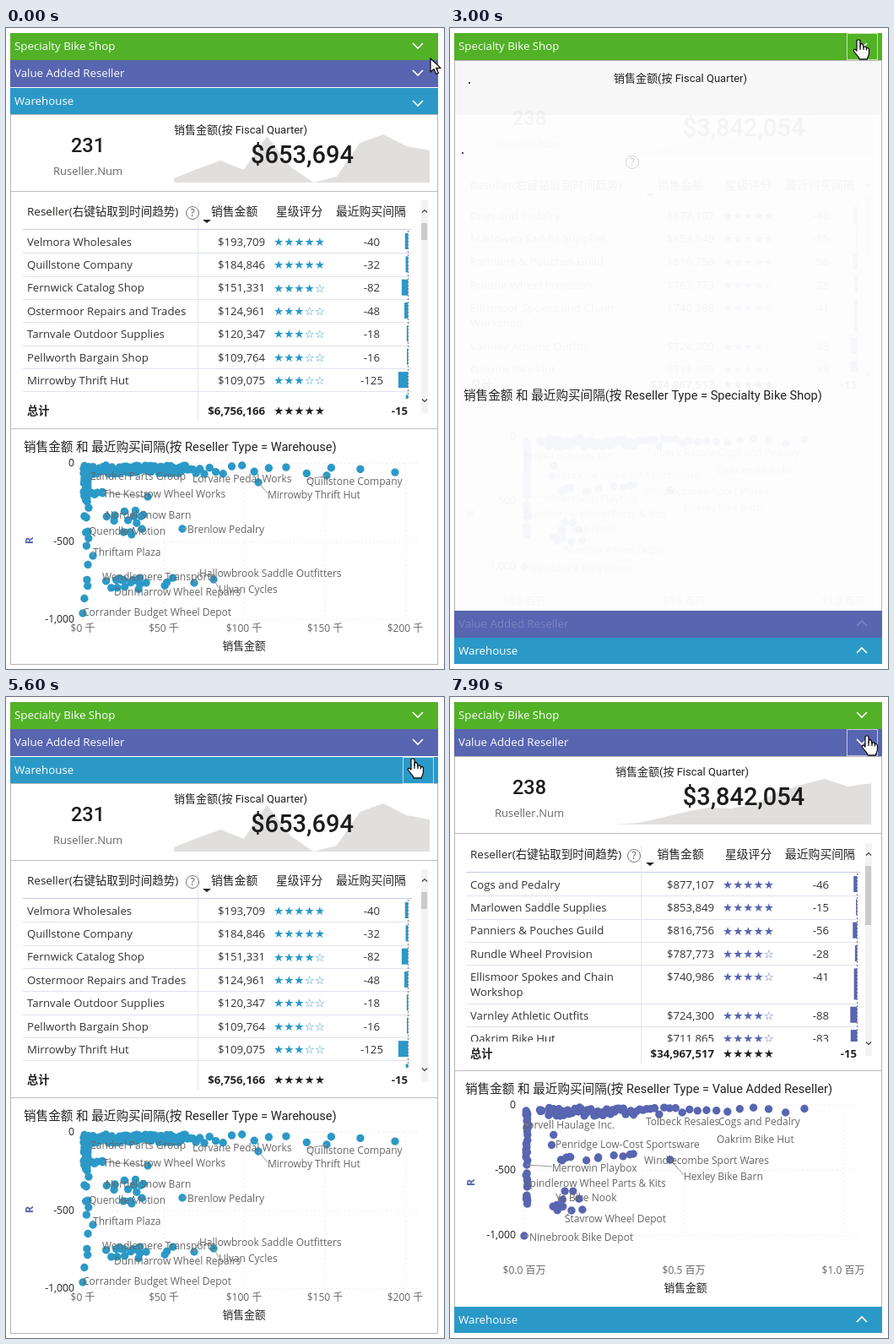
Recreate the animation shown at these times as an HTML page with a canvas. Size 519x759 px, loop 8000 ms.

```html
<!DOCTYPE html>
<html lang="zh">
<head>
<meta charset="utf-8">
<title>Reseller dashboard</title>
<style>
  html, body { margin: 0; width: 100%; height: 100%; overflow: hidden; background: #fff; }
  canvas { display: block; width: 519px; height: 759px; }
</style>
</head>
<body>
<canvas id="stage" width="519" height="759"></canvas>
<script>
const ctx = document.getElementById('stage').getContext('2d');
const LOOP = 8000, STEP = 100;
const CJK = '"Noto Sans CJK SC", "Noto Sans CJK", "Noto Sans CJK JP", sans-serif';
const UI = '"Open Sans", "Noto Sans", ' + CJK;
const DIN = 'Roboto, ' + CJK;
const STAR = '"DejaVu Sans", sans-serif';
const HEADERS = [['Specialty Bike Shop', '#52b127'], ['Value Added Reseller', '#5865b1'], ['Warehouse', '#2b99c7']];

const clamp = v => Math.max(0, Math.min(1, v));
const rand = n => { const v = Math.sin(n * 12.9898) * 43758.5453; return v - Math.floor(v); };

// Text is placed by the vertical middle of its capitals.
function text(str, x, y, { size = 13.2, color = '#333', align = 'left', font = UI, weight = 400 } = {}) {
  ctx.font = `${weight} ${size}px ${font}`;
  ctx.fillStyle = color;
  ctx.textAlign = align;
  ctx.fillText(str, x, y + size * 0.36);
}
function line(points, color, width = 1, dash = []) {
  ctx.strokeStyle = color;
  ctx.lineWidth = width;
  ctx.setLineDash(dash);
  ctx.beginPath();
  points.forEach(p => ctx.lineTo(...p));
  ctx.stroke();
  ctx.setLineDash([]);
}
function fillPoly(points, color) {
  ctx.fillStyle = color;
  ctx.beginPath();
  points.forEach(p => ctx.lineTo(...p));
  ctx.fill();
}
const row = (y, x0, x1, color, dash) => line([[x0, y + 0.5], [x1, y + 0.5]], color, 1, dash);
const column = (x, y0, y1, color, dash) => line([[x + 0.5, y0], [x + 0.5, y1]], color, 1, dash);
function rect(x, y, w, h, color) { ctx.fillStyle = color; ctx.fillRect(x, y, w, h); }
function group([x, y], draw) { ctx.save(); ctx.translate(x, y); draw(); ctx.restore(); }
function faded(alpha, draw) {
  if (alpha <= 0) return;
  ctx.save();
  ctx.globalAlpha *= alpha;
  draw();
  ctx.restore();
}
function chevron(x, y, up, size, color, width) {
  const d = up ? -size / 2 : size / 2;
  line([[x - size, y - d], [x, y + d], [x + size, y - d]], color, width);
}

// quarters: area heights; rows: name, sales, stars, gap in days
// band: u in 0..1 to x along the top of the scatter; clusters: count, x, y, width, height
// labels: text, x, y and, where it has one, the dot it belongs to
const smallShop = {
  count: '231', sales: '$653,694', total: '$6,756,166', shift: 0,
  quarters: [5, 16, 26, 15, 55, 19, 0, 7, 47, 57, 43, 38],
  rows: [
    ['Velmora Wholesales', '$193,709', 5, 40],
    ['Quillstone Company', '$184,846', 5, 32],
    ['Fernwick Catalog Shop', '$151,331', 4, 82],
    ['Ostermoor Repairs and Trades', '$124,961', 3, 48],
    ['Tarnvale Outdoor Supplies', '$120,347', 3, 18],
    ['Pellworth Bargain Shop', '$109,764', 3, 16],
    ['Mirrowby Thrift Hut', '$109,075', 3, 125],
    ['', '', 0, 30]],
  yStep: 92.5, xStep: 95.5, xLabels: ['$0 千', '$50 千', '$100 千', '$150 千', '$200 千'],
  origin: [0, 0], bandSize: 130, bandY: 518,
  band: u => 92 + 132 * u + 237 * u ** 24,
  clusters: [[35, 92, 520, 5, 45], [10, 91, 560, 7, 135], [5, 100, 547, 17, 8], [11, 100, 571, 82, 24],
    [3, 137, 596, 12, 4], [20, 94, 651, 105, 14]],
  labels: [
    ['Zandrel Parts Group', 100, 531], ['Lorvane Pedal Works', 221, 534],
    ['Quillstone Company', 356, 537, 380, 530], ['The Kestrow Wheel Works', 115, 552, 168, 555],
    ['Mirrowby Thrift Hut', 310, 553, 299, 538], ['Nordel Snow Barn', 118, 577],
    ['Quendle Motion', 98, 596], ['Brenlow Pedalry', 215, 594, 209, 593],
    ['Thriftam Plaza', 103, 621, 103, 625], ['Wendlemere Transports', 114, 650],
    ['Hallowbrook Saddle Outfitters', 229, 646, 223, 657], ['Dunmarrow Wheel Repairs', 128, 668],
    ['Ulvan Cycles', 252, 665, 246, 653], ['Corrander Budget Wheel Depot', 91, 692, 91, 693]]
};

const bigShop = {
  count: '238', sales: '$3,842,054', total: '$34,967,517', shift: 7,
  quarters: [0, 2, 8, 15, 20, 19, 25, 38, 47, 54, 45, 49],
  rows: [
    ['Cogs and Pedalry', '$877,107', 5, 46],
    ['Marlowen Saddle Supplies', '$853,849', 5, 15],
    ['Panniers & Pouches Guild', '$816,756', 5, 56],
    ['Rundle Wheel Provision', '$787,773', 4, 28],
    ['Ellismoor Spokes and Chain|Workshop', '$740,986', 4, 41],
    ['Varnley Athletic Outfits', '$724,300', 4, 88],
    ['Oakrim Bike Hut', '$711,865', 4, 83]],
  yStep: 77, xStep: 189, xLabels: ['$0.0 百万', '$0.5 百万', '$1.0 百万'],
  origin: [3, 32], bandSize: 75, bandY: 486,
  band: u => 117 + 145 * u ** 1.3 + 158 * u ** 10,
  clusters: [[45, 90, 490, 2, 114], [4, 93, 489, 20, 2], [2, 117, 517, 9, 14], [12, 122, 541, 115, 8],
    [9, 117, 580, 45, 28]],
  labels: [
    ['Jorvell Haulage Inc.', 89, 507, 93, 507], ['Tolbeck Resales', 232, 503],
    ['Cogs and Pedalry', 318, 503], ['Oakrim Bike Hut', 316, 524],
    ['Penridge Low-Cost Sportsware', 125, 530], ['Windlecombe Sport Wares', 230, 549],
    ['Merrowin Playbox', 121, 558, 91, 554], ['Hexley Bike Barn', 277, 568, 261, 548],
    ['Spindlerow Wheel Parts & Kits', 88, 576], ['Ye Bike Nook', 125, 593],
    ['Stavrow Wheel Depot', 136, 618, 144, 608], ['Ninebrook Bike Depot', 94, 640, 88, 638]]
};

// shift: how far the content lies from its place on the last page
const pages = [
  { data: smallShop, shift: [-5, -61], thumb: 72 },
  { data: bigShop, shift: [-3, -32], thumb: 70 },
  { data: smallShop, shift: [0, 0], thumb: 20 }
];
pages.forEach(page => {
  const [x, y] = page.shift;
  page.tableShift = [Math.trunc(x * 0.6), Math.round(y * 0.98)];
});

// Headers after the open one stack at the bottom.
const headerTop = (i, open) => i > open ? 658 + 32 * i : [6, 38, 71][i];
const headerHeight = i => i === 2 ? 31 : 32;

function drawHeaders(open, age) {
  const all = open === 2;
  HEADERS.forEach(([title, color], i) => {
    const y = headerTop(i, open);
    faded(all ? clamp(0.16 + age / 350) : 1, () => rect(5, y, 507, headerHeight(i), color));
    const fresh = i === open + 1 || (all && i > 0);
    faded(fresh ? clamp(0.2 + age / 250) : 1, () => {
      text(title, 10, y + 15, { size: 13.3, color: '#fff' });
      chevron(488, y + (all && i === 2 ? 18 : 15), i > open, 6, '#fff', 1.6);
    });
  });
}

function drawCard({ quarters, count, sales }) {
  const tops = quarters.map((h, i) => [199 + 27.55 * i, 183 - h]);
  fillPoly([[199, 183], ...tops, [502, 183]], '#e0dfde');
  const number = { font: DIN, align: 'center', color: '#1c1c1c', weight: 500 };
  text(count, 97, 139, { ...number, size: 23.5 });
  text('Ruseller.Num', 97, 169, { size: 13, align: 'center', color: '#666' });
  text(sales, 351, 150, { ...number, size: 29 });
}

function drawTable({ rows, total, shift }, color) {
  const stars = { size: 13.6, font: STAR };
  const head = { size: 13.8, color: '#252423' };
  text('Reseller(右键钻取到时间趋势)', 25, 217, { ...head, size: 13.5 });
  text('销售金额', 243 + shift / 2, 217, head);
  text('星级评分', 320 + shift, 217, head);
  text('最近购买间隔', 391 + shift, 217, head);
  fillPoly([[233, 227], [243, 227], [238, 231]], '#222');
  row(238, 20, 480 + shift, '#c3c9e4');
  column(227, 207, 465, '#e4e6f2');

  ctx.save();
  ctx.beginPath();
  ctx.rect(15, 239, 475, 200);
  ctx.clip();
  let y = 253;
  rows.forEach(([name, value, score, gap]) => {
    const parts = name.split('|'), extra = 18 * (parts.length - 1), w = Math.max(1, gap * 0.093);
    parts.forEach((part, k) => text(part, 25, y + 18 * k));
    if (value) {
      text(value, 307 + shift, y, { align: 'right' });
      text('★'.repeat(score) + '☆'.repeat(5 - score), 317 + shift, y, { ...stars, color });
      text('-' + gap, 433.5 + shift, y, { align: 'center' });
    }
    rect(476.5 + shift - w, y - 10, w, 19 + extra, color);
    y += 27.35 + extra;
    row(Math.round(y - 14), 20, 480 + shift, '#dfe2f2');
  });
  column(476 + shift, 240, 439, '#777', [2, 2]);
  ctx.restore();

  const bold = { weight: 700, color: '#222' };
  text('总计', 25, 453, bold);
  text(total, 307 + shift, 453, { ...bold, align: 'right' });
  text('★★★★★', 317 + shift, 453, { ...stars, color: '#222' });
  text('-15', 476 + shift, 453, { ...bold, align: 'right' });
}

function drawScroll(thumb) {
  rect(492, 204, 8, 252, '#f3f3f3');
  rect(492, 231, 7, thumb, '#cbcbcb');
  chevron(496, 217, true, 3, '#444', 1.2);
  chevron(496, 441, false, 3, '#444', 1.2);
}

function drawHelp() {
  ctx.strokeStyle = '#777';
  ctx.lineWidth = 1;
  ctx.beginPath();
  ctx.arc(221, 219, 7.5, 0, 7);
  ctx.stroke();
  text('?', 221, 219, { size: 12, align: 'center', color: '#555' });
}

function drawDots({ band, bandSize, bandY, clusters, labels }, color) {
  let seed = 1;
  const dot = (x, y) => { ctx.moveTo(x + 4.7, y); ctx.arc(x, y, 4.7, 0, 7); };
  ctx.fillStyle = color;
  ctx.beginPath();
  for (let i = 0; i <= bandSize; i++) dot(band(i / bandSize), bandY + 10 * rand(seed++));
  clusters.forEach(([count, x, y, w, h]) => {
    for (let i = 0; i < count; i++) dot(x + w * rand(seed++), y + h * rand(seed++) ** 1.3);
  });
  const anchored = labels.filter(label => label.length > 3);
  anchored.forEach(([, , , x, y]) => dot(x, y));
  ctx.fill();
  anchored.forEach(([, x, y, dotX, dotY]) => line([[dotX, dotY], [x, y - 2]], '#999'));
  labels.forEach(([label, x, y]) => text(label, x, y, { size: 12, color: '#666' }));
}

function drawScatter(data, color) {
  const grid = '#e2e2e2', dash = [1, 4];
  ['0', '-500', '-1,000'].forEach((label, i) => {
    const y = Math.round(515 + i * data.yStep);
    row(y, 91, 490, grid, dash);
    text(label, 81, y, { size: 12.2, align: 'right', color: '#222' });
  });
  data.xLabels.forEach((label, i) => {
    const x = Math.round(91 + i * data.xStep);
    column(x, 515, 515 + 2 * data.yStep, grid, dash);
    text(label, x, 711, { size: 12, color: '#666', align: 'center' });
  });
  text('销售金额', 282, 731, { size: 12.8, align: 'center', color: '#222' });
  group([27, 607], () => {
    ctx.rotate(-Math.PI / 2);
    text('R', 0, 0, { size: 13, weight: 700, align: 'center', color: HEADERS[1][1] });
  });
  group(data.origin, () => drawDots(data, color));
}

function drawContent(open) {
  const { data, shift, tableShift, thumb } = pages[open], color = HEADERS[open][1];
  group(shift, () => { drawCard(data); drawScatter(data, color); });
  group(tableShift, () => drawTable(data, color));
  group([0, tableShift[1]], () => drawScroll(thumb));
}

function drawPage(open, previous, age) {
  const { shift, tableShift } = pages[open], shown = clamp(age / 300);
  const top = 38 + 32 * open, bottom = Math.min(753, 690 + 32 * open);
  if (shown < 1) {
    rect(5, 38, 507, 652, '#fdfdfd');
    rect(5, open === 2 ? 690 : 38, 507, 65, '#f7f7f7');
    faded(0.04 * (1 - shown), () => drawContent(previous));
  }
  faded(shown, () => {
    drawContent(open);
    [193, 474].forEach(y => row(y + shift[1], 5, 512, '#bdbdbd'));
  });
  faded(0.3 + 0.7 * shown, () => group([shift[0], tableShift[1]], drawHelp));
  group(shift, () => {
    const title = { font: DIN, color: '#222' };
    text('销售金额(按 Fiscal Quarter)', 199, 120, { ...title, size: 13 });
    text(`销售金额 和 最近购买间隔(按 Reseller Type = ${HEADERS[open][0]})`, 21, 496, { ...title, size: 14.6 });
    if (!shown) [[27, 125], [19, 208]].forEach(([x, y]) => rect(x, y, 2, 2, '#444'));
  });
  ctx.strokeStyle = '#b5b5b5';
  ctx.lineWidth = 1;
  ctx.strokeRect(5.5, top + 0.5, 506, bottom - top);
  drawHeaders(open, age);
}

const ARROW = new Path2D('M0 0V16L4 12.4L6.8 18.6L9.4 17.4L6.7 11.4H12Z');
const HAND = new Path2D('M-2 1.5C-2-.8 2-.8 2 1.5V8C3-.0 6 7 6 9C7 7.3 9.5 7.8 9.5 10C10.5 8.8 12.5 9.5 12.5 11.5' +
  'V16C12.5 19 10.5 20 10.5 23H1C1 20-3 17.5-5.5 13.5C-6.5 11.2-4 10.2-2 13Z');
const KNUCKLES = new Path2D('M2 7V12M6 8.5V12M9.5 9.5V12.5');

// [start, end, x, y]
const moves = [[0, 100, 498, 18], [100, 300, 487, 57], [1200, 1300, 488, 51], [2900, 3000, 484, 14],
  [3800, 4000, 479, 731], [4600, 5100, 482, 73], [6200, 6400, 494, 46]];

function pointerAt(t) {
  let x = 503, y = 36;
  for (const [start, end, toX, toY] of moves) {
    const k = clamp((t - start) / (end - start));
    x += (toX - x) * k;
    y += (toY - y) * k;
  }
  return [x, y];
}

function drawPointer(t, open) {
  const [x, y] = pointerAt(t);
  const hovered = HEADERS.findIndex((_, i) => {
    const top = headerTop(i, open);
    return x < 500 && y >= top && y < top + headerHeight(i);
  });
  const hand = hovered >= 0, shape = hand ? HAND : ARROW;
  ctx.lineWidth = 1;
  ctx.strokeStyle = 'rgba(255,255,255,.65)';
  if (hand) ctx.strokeRect(470.5, headerTop(hovered, open) + 0.5, 36, 31);
  group([x, y], () => {
    ctx.lineJoin = 'round';
    ctx.lineWidth = 1.3;
    ctx.strokeStyle = '#111';
    ctx.fillStyle = '#fff';
    ctx.fill(shape);
    ctx.stroke(shape);
    if (hand) ctx.stroke(KNUCKLES);
  });
}

// [start, page]
const switches = [[-LOOP, 2], [1300, 1], [3000, 0], [5200, 2], [7100, 1]];

function render(time) {
  const t = Math.floor((time % LOOP) / STEP) * STEP;
  const n = switches.findLastIndex(s => s[0] <= t);
  const [start, open] = switches[n];
  rect(0, 0, 519, 759, '#fff');
  drawPage(open, n ? switches[n - 1][1] : open, t - start);
  drawPointer(t, open);
}

const begin = performance.now();
function frame() {
  render(performance.now() - begin);
  requestAnimationFrame(frame);
}
frame();
</script>
</body>
</html>
```
